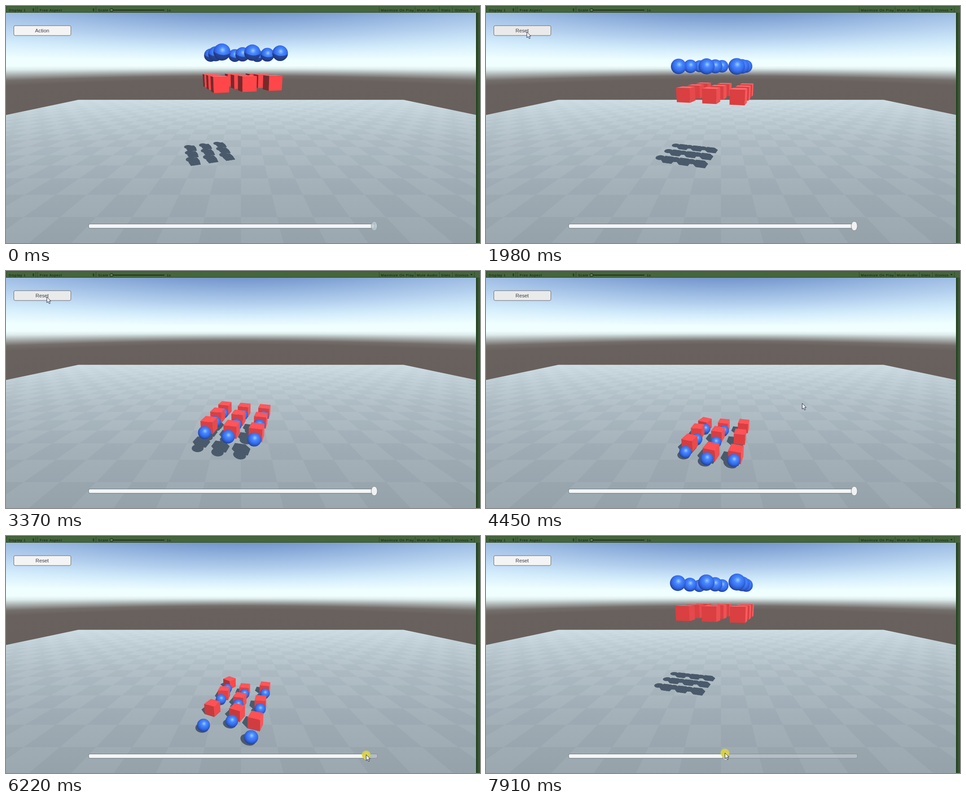
Recreate the animation shown at these times as an HTML page with a canvas. Size 1056x530 px, loop 7990 ms.

```html
<!DOCTYPE html>
<html lang="en">
<head>
<meta charset="utf-8">
<title>Physics rewind</title>
<style>
  html, body { margin: 0; width: 100%; height: 100%; overflow: hidden; background: #2f4b2b; }
  canvas { display: block; }
</style>
</head>
<body>
<canvas id="stage" width="1056" height="530"></canvas>
<script>
const canvas = document.getElementById('stage');
const ctx = canvas.getContext('2d');
const LOOP = 7990, STEP = LOOP / 104;
const VIEW_W = 1047, BAR_H = 15;

// Camera: focal length, centre column, horizon row, pitch and eye height (one cube = 1).
const F = 446, CX = 523.5, HORIZON = 134, SIN = 0.296, COS = 0.955, EYE = 10;
const LIGHT = [0.321, 0.766, -0.557];
const G = 9.81, START = 1580, DRAG = 6100;
const CENTER = { x: -0.17, z: 15.72 }, PITCH = 1.9;
const CUBE_TOP = 8.86, BALL_TOP = 10.78;

const mix = (a, b, k) => a + (b - a) * k;
const clamp = (v, lo, hi) => Math.min(hi, Math.max(lo, v));
const dot = (a, b) => a[0] * b[0] + a[1] * b[1] + a[2] * b[2];

function project([x, y, z]) {
  const d = z * COS + (EYE - y) * SIN;
  return { x: CX + F * x / d, y: HORIZON + F * (EYE - y) / (COS * d), d };
}

function unproject(sx, sy, y) {
  const d = F * (EYE - y) / (COS * (sy - HORIZON));
  return { x: (sx - CX) * d / F, z: (d - (EYE - y) * SIN) / COS };
}

function polygon(g, points, color) {
  g.beginPath();
  points.forEach(p => g.lineTo(p.x, p.y));
  g.closePath();
  g.fillStyle = color;
  g.fill();
}

function box(g, x, y, w, h, r, fill, stroke) {
  g.beginPath();
  g.roundRect(x, y, w, h, r);
  g.fillStyle = fill;
  g.fill();
  if (stroke) { g.strokeStyle = stroke; g.lineWidth = 1; g.stroke(); }
}

function gradient(g, y0, y1, stops) {
  const grad = g.createLinearGradient(0, y0, 0, y1);
  stops.forEach(([y, c]) => grad.addColorStop(clamp((y - y0) / (y1 - y0), 0, 1), c));
  return grad;
}

// ---- static backdrop ----
const SKY = [
  [-119, '#7395cb'], [-90, '#93b3de'], [-60, '#b4d0ee'], [-35, '#d3ecfb'], [-12, '#effeff'],
  [0, '#f0fefe'], [6, '#dcebeb'], [14, '#a6acab'], [22, '#746e6b'], [30, '#69615e'], [120, '#675f5b']
];

function drawSky(g) {
  for (let x = 0; x < VIEW_W; x += 3) {
    const bend = Math.hypot(1, (x - CX) * COS / F);
    g.fillStyle = gradient(g, HORIZON - 119 * bend, HORIZON + 120 * bend,
      SKY.map(([y, c]) => [HORIZON + y * bend, c]));
    g.fillRect(x, BAR_H, 3, 240);
  }
}

function drawFloor(g) {
  const tile = 2.5, z0 = 11.37;
  const quad = (x0, x1, za, zb) =>
    [[x0, 0, za], [x1, 0, za], [x1, 0, zb], [x0, 0, zb]].map(project);
  polygon(g, quad(-50, 50, z0 - tile, z0 + 20 * tile), gradient(g, 210, 530, [
    [210, '#cfdee4'], [250, '#c0ced5'], [300, '#b3c0c8'], [400, '#a5b1b9'], [530, '#9ca8b0']
  ]));
  for (let row = -1; row < 20; row++) {
    const z = z0 + row * tile;
    const alpha = 0.075 * (1 - row / 26);
    for (let col = -20; col < 20; col++) {
      if ((row + col) & 1) continue;
      polygon(g, quad(col * tile, (col + 1) * tile, z, z + tile), `rgba(70,92,108,${alpha})`);
    }
  }
}

function drawToolbar(g) {
  g.fillStyle = '#45653c';
  g.fillRect(0, 0, 1056, BAR_H);
  g.fillStyle = '#35552f';
  g.fillRect(0, 0, 1056, 1);
  g.fillRect(VIEW_W, BAR_H, 9, 515);
  g.fillStyle = '#1f3a1f';
  g.fillRect(VIEW_W + 1, BAR_H, 2, 515);
  g.fillStyle = '#2c4727';
  [1, 66, 70, 200, 831, 911, 965, 994, 1043].forEach(x => g.fillRect(x, 2, 1, 12));
  g.fillRect(0, 14, VIEW_W, 1);

  g.fillStyle = '#10190e';
  g.font = '8px "Liberation Sans", Arial, sans-serif';
  g.letterSpacing = '0.6px';
  [['Display 1', 6], ['Free Aspect', 75], ['Scale', 205], ['1x', 358], ['Maximize On Play', 835],
   ['Mute Audio', 915], ['Stats', 969], ['Gizmos', 1000]].forEach(([s, x]) => g.fillText(s, x, 11.5));
  g.letterSpacing = '0px';

  const arrow = (x, y, dy) => polygon(g, [{ x: x - 2, y }, { x: x + 2, y }, { x, y: y + dy }], '#10190e');
  [61, 195].forEach(x => { arrow(x, 8, -2.5); arrow(x, 9.5, 2.5); });
  arrow(1037, 7, 3);

  g.fillRect(236, 8.5, 117, 1.5);
  g.beginPath();
  g.arc(235, 9, 3.5, 0, 7);
  g.fillStyle = '#5b7852';
  g.fill();
  g.strokeStyle = '#10190e';
  g.stroke();
}

const backdrop = document.createElement('canvas');
backdrop.width = 1056;
backdrop.height = 530;
const back = backdrop.getContext('2d');
drawSky(back);
drawFloor(back);
drawToolbar(back);

// ---- simulation: rows from back to front, each left to right, as screen points ----
const CUBE_LANDED = [[488, 342], [530, 345], [574, 346], [472, 357], [517, 364], [566, 370], [454, 383], [502, 403], [557, 408]];
const CUBE_REST = [[498, 328], [532, 344], [577, 340], [486, 351], [521, 366], [567, 373], [460, 384], [515, 394], [556, 413]];
const BALL_LANDED = [[489, 353], [530, 357], [572, 353], [470, 376], [512, 383], [563, 375], [444, 405], [492, 420], [552, 424]];
const BALL_REST = [[493, 341], [531, 353], [577, 352], [479, 365], [517, 377], [566, 387], [440, 423], [503, 414], [546, 450]];
const TURN = [-25, 5, 0, 5, -5, 5, -12, -12, -6];
const LAND_T = 2.87, REST_T = 4.22, HIT_T = 1.31;

// Free fall to the first hit, then a series of decaying bounces on the floor.
function height(t, top, hit, v, keep) {
  const fall = Math.sqrt(2 * (top - hit) / G);
  if (t < fall) return top - G / 2 * t * t;
  t -= fall;
  let y = hit;
  while (v > 0.4) {
    const landing = Math.sqrt(v * v + 2 * G * (y - 0.5));
    const flight = (v + landing) / G;
    if (t < flight) return y + v * t - G / 2 * t * t;
    t -= flight;
    y = 0.5;
    v = landing * keep;
  }
  return 0.5;
}
const cubeHeight = t => height(t, CUBE_TOP, 0.5, 7.1, 0.55);
const ballHeight = t => height(t, BALL_TOP, 1.9, 3.66, 0.4);

function drift(t, from, landed, rest, heightAt) {
  const a = unproject(...landed, heightAt(LAND_T));
  const b = unproject(...rest, 0.5);
  const k = clamp((t - HIT_T) / (LAND_T - HIT_T), 0, 1);
  const left = 1 - clamp((t - LAND_T) / (REST_T - LAND_T), 0, 1);
  const m = 1 - left * left;
  const blend = axis => t < LAND_T ? mix(from[axis], a[axis], k) : mix(a[axis], b[axis], m);
  return [blend('x'), heightAt(t), blend('z')];
}

function bodies(t, yawDeg) {
  const yaw = yawDeg * Math.PI / 180, c = Math.cos(yaw), s = Math.sin(yaw);
  const list = [];
  for (let i = 0; i < 9; i++) {
    const a = (i % 3 - 1) * PITCH, b = (1 - Math.floor(i / 3)) * PITCH;
    const at = depth => ({ x: CENTER.x + a * c - depth * s, z: CENTER.z + a * s + depth * c });
    const turn = TURN[i] * clamp((t - HIT_T - 0.4) / (REST_T - HIT_T - 0.4), 0, 1);
    list.push({
      cube: true,
      yaw: yaw + turn * Math.PI / 180,
      pos: drift(t, at(b), CUBE_LANDED[i], CUBE_REST[i], cubeHeight)
    });
    list.push({ pos: drift(t, at(b - 0.9), BALL_LANDED[i], BALL_REST[i], ballHeight) });
  }
  list.forEach(o => o.depth = project(o.pos).d);
  return list.sort((p, q) => q.depth - p.depth);
}

// ---- drawing the bodies ----
function cubeFaces({ pos, yaw }) {
  const c = Math.cos(yaw), s = Math.sin(yaw);
  const axes = [[c, 0, s], [0, 1, 0], [-s, 0, c]];
  const faces = [];
  for (let k = 0; k < 3; k++) for (const sign of [-1, 1]) {
    const n = axes[k].map(v => v * sign), u = axes[(k + 1) % 3], w = axes[(k + 2) % 3];
    const corners = [[-1, -1], [1, -1], [1, 1], [-1, 1]].map(([p, q]) =>
      pos.map((v, j) => v + (n[j] + u[j] * p + w[j] * q) / 2));
    faces.push({ n, corners });
  }
  return faces;
}

function drawCube(o) {
  for (const { n, corners } of cubeFaces(o)) {
    const eye = [0, EYE, 0].map((v, j) => v - o.pos[j] - n[j] / 2);
    const facing = dot(n, eye) / Math.hypot(...eye);
    if (facing <= 0) continue;
    const lit = Math.max(0, dot(n, LIGHT));
    const shine = lit > 0 ? 45 * (1 - facing) ** 3 : 0;
    const red = Math.min(255, 118 + 220 * lit + shine);
    const rest = Math.min(82, 44 + 47 * lit) + shine;
    polygon(ctx, corners.map(project), `rgb(${red},${rest * 0.96},${rest})`);
  }
}

function drawBall(o, banded) {
  const p = project(o.pos), r = F * 0.5 / p.d;
  const grad = ctx.createRadialGradient(p.x + r * 0.08, p.y - r * 0.25, 0, p.x + r * 0.1, p.y - r * 0.18, r * 1.18);
  [[0, '#a3d3ff'], [0.12, '#78b2ff'], [0.32, '#4788fc'], [0.62, '#376ff0'], [0.85, '#2b56c4'], [1, '#213f91']]
    .forEach(([k, c]) => grad.addColorStop(k, c));
  ctx.save();
  ctx.beginPath();
  ctx.arc(p.x, p.y, r, 0, 7);
  ctx.fillStyle = grad;
  ctx.fill();
  if (banded) {
    ctx.clip();
    ctx.beginPath();
    ctx.moveTo(p.x - r, p.y - r * 0.05);
    ctx.quadraticCurveTo(p.x, p.y + r * 0.65, p.x + r, p.y + r * 0.15);
    ctx.lineTo(p.x + r, p.y + r);
    ctx.lineTo(p.x - r, p.y + r);
    ctx.fillStyle = 'rgba(34,52,112,.7)';
    ctx.fill();
  }
  ctx.restore();
}

function drawShadow(o) {
  const drop = ([x, y, z]) => {
    const k = Math.max(0, y) / LIGHT[1];
    return project([x - LIGHT[0] * k, 0, z - LIGHT[2] * k]);
  };
  const color = '#4a5a6b';
  if (o.cube) {
    cubeFaces(o).forEach(f => polygon(ctx, f.corners.map(drop), color));
    return;
  }
  // Disc facing the light, cast onto the floor.
  const flat = Math.hypot(LIGHT[0], LIGHT[2]);
  const u = [-LIGHT[2] / flat, 0, LIGHT[0] / flat];
  const w = [-LIGHT[0] * LIGHT[1] / flat, flat, -LIGHT[2] * LIGHT[1] / flat];
  const rim = [];
  for (let i = 0; i < 24; i++) {
    const a = i * Math.PI / 12, c = Math.cos(a) / 2, s = Math.sin(a) / 2;
    rim.push(drop(o.pos.map((v, j) => v + u[j] * c + w[j] * s)));
  }
  polygon(ctx, rim, color);
}

// ---- interface ----
const PATH = [
  [70, 955, 500], [900, 91, 58], [4215, 91, 58], [4440, 703, 296], [4700, 800, 291],
  [5000, 800, 291], [5600, 820, 489], [6100, 820, 489], [6220, 801, 489], [7370, 618, 485], [7990, 518, 485]
];

function cursorAt(T) {
  const i = PATH.findIndex(p => p[0] > T);
  if (i < 1) return null;
  const [t0, x0, y0] = PATH[i - 1], [t1, x1, y1] = PATH[i];
  const k = (T - t0) / (t1 - t0);
  return { x: mix(x0, x1, k), y: mix(y0, y1, k) };
}

function drawButton(T) {
  const pressed = T > START - 100 && T < START + 40;
  const hover = T > 880 && T < DRAG - 40;
  box(ctx, 17.5, 44, 127, 22, 3, pressed ? '#c8c8c8' : hover ? '#ebeaea' : '#f4f4f4', '#5d676f');
  ctx.fillStyle = '#3c3c48';
  ctx.font = '11.3px "Liberation Sans", Arial, sans-serif';
  ctx.textAlign = 'center';
  ctx.fillText(T < START ? 'Action' : 'Reset', 80.5, 59);
  ctx.textAlign = 'left';
}

function drawSlider(T, x) {
  const idle = T < START, dragging = T > DRAG;
  box(ctx, 184, 487.5, 643.5, 9.5, 3, 'rgba(190,198,203,.75)', '#7f8b93');
  box(ctx, 184, 487.5, x - 184, 9.5, 3, '#f3f5f6', '#6b757c');
  ctx.beginPath();
  ctx.ellipse(x, 492, 6.8, 10.3, 0, 0, 7);
  ctx.fillStyle = idle ? 'rgba(188,202,210,.8)' : dragging ? '#c6cacd' : '#f1f1f2';
  ctx.fill();
  ctx.strokeStyle = idle ? '#8b99a2' : '#838b91';
  ctx.lineWidth = 1;
  ctx.stroke();
}

function drawCursor(T) {
  const p = cursorAt(T);
  if (!p) return;
  if (T > DRAG - 60 || Math.abs(T - START + 30) < 80) {
    ctx.beginPath();
    ctx.arc(p.x, p.y + 0.5, 9.8, 0, 7);
    ctx.fillStyle = 'rgba(222,214,58,.85)';
    ctx.fill();
  }
  ctx.beginPath();
  [[0, 0], [0, 13], [3, 10.2], [5.2, 15], [7.4, 14], [5.2, 9.4], [9, 9.2]]
    .forEach(([x, y]) => ctx.lineTo(p.x + x, p.y + y));
  ctx.closePath();
  ctx.fillStyle = '#f7f9fb';
  ctx.fill();
  ctx.strokeStyle = '#1d2840';
  ctx.lineWidth = 1;
  ctx.stroke();
}

function render(T) {
  const handle = 820.5 - Math.max(0, T - DRAG) * 0.159;
  const t = T < DRAG
    ? Math.max(0, T - START) / 1000
    : Math.max(0, 4.52 - (T - DRAG) * 0.0025);
  const yaw = mix(18, -15, Math.min(1, T / START));
  const scene = bodies(t, yaw);

  ctx.drawImage(backdrop, 0, 0);
  scene.forEach(drawShadow);
  scene.forEach(o => o.cube ? drawCube(o) : drawBall(o, T < START));
  drawButton(T);
  drawSlider(T, handle);
  drawCursor(T);
}

function tick() {
  const now = performance.now() % LOOP;
  const step = Math.min(103, Math.floor((now + 22) / STEP));
  render(Math.max(0, step * STEP - 12));
  requestAnimationFrame(tick);
}
tick();
</script>
</body>
</html>
```
